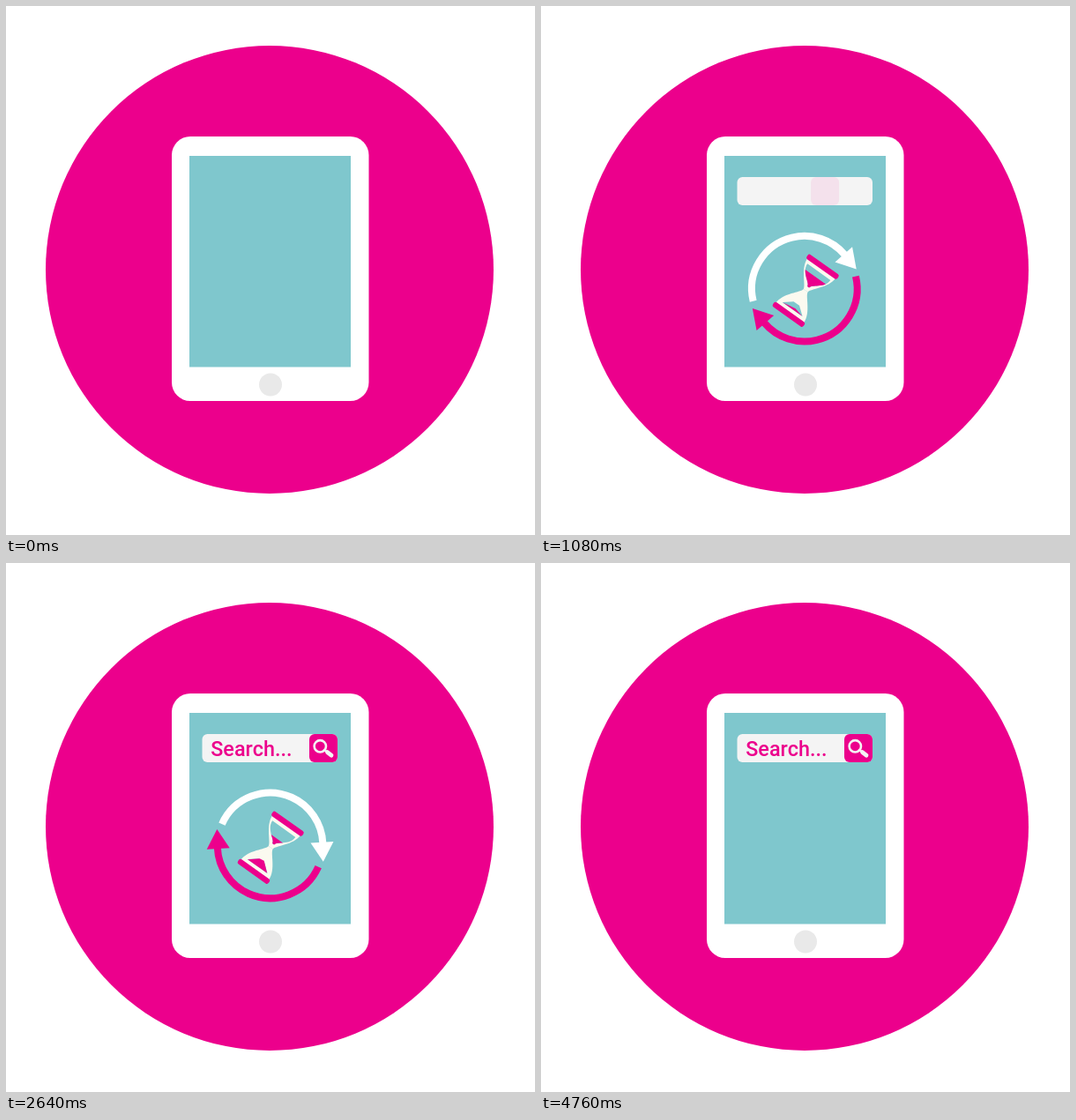
An HTML page with a canvas that plays this animation: 600 by 600 pixels, repeating every 4.8 s.

```html
<!DOCTYPE html>
<html lang="en">
<head>
<meta charset="utf-8">
<title>Tablet search</title>
<style>
  html, body { margin: 0; width: 100%; height: 100%; overflow: hidden; background: #fff; }
  canvas { display: block; width: 600px; height: 600px; }
</style>
</head>
<body>
<canvas id="stage" width="600" height="600"></canvas>
<script>
const ctx = document.getElementById('stage').getContext('2d');
const LOOP = 4800, STEP = 40, RAD = Math.PI / 180;
const PINK = '#ec008c', TEAL = '#7fc7cd', WHITE = '#fff', CREAM = '#fbfaf0', GREY = '#f4f4f4';

const clamp = x => Math.min(1, Math.max(0, x));
const progress = (t, from, to) => clamp((t - from) / (to - from));
const smooth = u => u * u * (3 - 2 * u);
const ease = (t, from, to) => smooth(progress(t, from, to));

function layer(draw, x = 0, y = 0, angle = 0, scale = 1, alpha = 1) {
  if (scale <= 0 || alpha <= 0) return;
  ctx.save();
  ctx.translate(x, y);
  ctx.rotate(angle * RAD);
  ctx.scale(scale, scale);
  ctx.globalAlpha *= alpha;
  draw();
  ctx.restore();
}

function box(x, y, w, h, r, color) {
  ctx.fillStyle = color;
  ctx.beginPath();
  ctx.roundRect(x, y, w, h, r);
  ctx.fill();
}

function disc(x, y, r, color) {
  ctx.fillStyle = color;
  ctx.beginPath();
  ctx.arc(x, y, r, 0, 7);
  ctx.fill();
}

function polygon(color, ...points) {
  ctx.fillStyle = color;
  ctx.beginPath();
  points.forEach(([x, y]) => ctx.lineTo(x, y));
  ctx.fill();
}

function tablet() {
  disc(299, 299, 254, PINK);
  box(188, 148, 223.5, 300, 21, WHITE);
  ctx.fillStyle = TEAL;
  ctx.fillRect(208, 170, 183, 239.5);
  disc(300, 429.5, 13, '#e9e9e9');
}

// Two eased one-and-a-half turns that keep a little speed where they meet.
function arrowAngle(t) {
  const start = -50, middle = 1950, end = 3840, drift = 58;
  if (t < middle) {
    const u = progress(t, start, middle);
    return 206 + 540 * smooth(u) + drift * u * u * (u - 1);
  }
  const u = progress(t, middle, end);
  return 746 + 540 * smooth(u) + drift * u * (1 - u) ** 2;
}

function arrow(color) {
  ctx.strokeStyle = color;
  ctx.lineWidth = 8;
  ctx.beginPath();
  ctx.arc(0, 0, 59.8, -152.5 * RAD, 1 * RAD);
  ctx.stroke();
  polygon(color, [46, 0], [72, 0], [59, 22]);
}

function arrows(t) {
  const tip = arrowAngle(t);
  const alpha = ease(t, 0, 420) * (1 - ease(t, 4490, 4750));
  const wobble = (tip + 72) * RAD;
  const x = 299.6 + 1.3 * Math.cos(wobble), y = 321.7 + 1.3 * Math.sin(wobble);
  layer(() => arrow(WHITE), x, y, tip + 158.6, 1, alpha);
  layer(() => arrow(PINK), x, y, tip - 21.4, 1, alpha);
}

function bulb(side, halfWidth, base, neckWidth, neck) {
  ctx.beginPath();
  ctx.moveTo(-halfWidth, side * base);
  ctx.bezierCurveTo(-halfWidth, side * base * 0.55, -neckWidth, side * (neck + 5), -neckWidth, side * neck);
  ctx.lineTo(neckWidth, side * neck);
  ctx.bezierCurveTo(neckWidth, side * (neck + 5), halfWidth, side * base * 0.55, halfWidth, side * base);
  ctx.closePath();
}

function glass(t) {
  ctx.fillStyle = CREAM;
  bulb(-1, 19.5, 31, 3, 0);
  ctx.fill();
  bulb(1, 19.5, 31, 3, 0);
  ctx.fill();

  ctx.save();
  bulb(-1, 16, 26, 1.2, 5);
  ctx.clip();
  ctx.fillStyle = TEAL;
  ctx.fillRect(-20, -27, 40, 27);
  ctx.fillStyle = PINK;
  const level = -23.8 + 0.00436 * t;
  if (t < 4000) ctx.fillRect(-20, level, 40, -level);
  ctx.restore();

  polygon(TEAL, [-14, 26], [-4, 18], [4, 18], [14, 26]);
  const peak = 26 - 13.8 * progress(t, 500, 3600);
  polygon(PINK, [-13.5, 26], [-3, peak + 0.8], [2.5, peak], [13.5, 26]);
}

function hourglass(t) {
  const grow = ease(t, 80, 520);
  const leave = ease(t, 3880, 4333);
  const fade = 1 - ease(t, 4490, 4750);
  layer(() => {
    layer(() => glass(t), 0, 0, 0, 1 - leave);
    layer(() => {
      box(-21.3, -36.4 - 65 * leave, 42.6, 6.4, 2.4, PINK);
      box(-21.3, 30 + 50 * leave, 42.6, 6.4, 2.4, PINK);
    }, 0, 0, 0, 1, fade);
  }, 300.2, 322.8, 35.4, grow);
}

function letterScale(u) {
  return u < 0.7 ? 1.12 * smooth(u / 0.7) : 1.12 - 0.12 * smooth((u - 0.7) / 0.3);
}

function label(t) {
  const text = 'Search...';
  ctx.font = '500 23.4px Roboto, "Open Sans", sans-serif';
  ctx.textAlign = 'center';
  ctx.fillStyle = PINK;
  let x = 232.2;
  [...text].forEach((char, i) => {
    const width = ctx.measureText(char).width;
    const start = 1080 + 35 * i;
    const scale = letterScale(progress(t, start, start + 450));
    layer(() => ctx.fillText(char, 0, 0), x + width / 2, 219, 0, scale);
    x += width;
  });
}

function magnifier() {
  ctx.strokeStyle = GREY;
  ctx.lineWidth = 2.6;
  ctx.beginPath();
  ctx.arc(356.3, 207.8, 6.7, 0, 7);
  ctx.stroke();
  ctx.lineCap = 'round';
  ctx.beginPath();
  ctx.moveTo(361, 212);
  ctx.lineTo(364, 214.3);
  ctx.stroke();
  ctx.lineWidth = 4.8;
  ctx.beginPath();
  ctx.moveTo(364.5, 214.6);
  ctx.lineTo(369, 218.2);
  ctx.stroke();
}

function searchBar(t) {
  ctx.save();
  ctx.beginPath();
  ctx.rect(208, 170, 183, 239.5);
  ctx.clip();
  box(222.5, 138 + 56 * ease(t, 10, 870), 153.5, 32, 6, GREY);
  ctx.restore();
  label(t);
  const left = 306 + 38 * ease(t, 1040, 2320);
  layer(() => box(left, 194, 32, 32, 6, PINK), 0, 0, 0, 1, progress(t, 1040, 1560));
  layer(magnifier, 0, 0, 0, 1, progress(t, 1400, 1900));
}

function draw(now) {
  const t = Math.floor((now % LOOP) / STEP) * STEP;
  ctx.fillStyle = WHITE;
  ctx.fillRect(0, 0, 600, 600);
  tablet();
  if (t > 0) {
    arrows(t);
    hourglass(t);
    searchBar(t);
  }
}

let origin;
function tick(now) {
  origin ??= now;
  draw(now - origin);
  requestAnimationFrame(tick);
}
draw(0);
requestAnimationFrame(tick);
</script>
</body>
</html>
```
